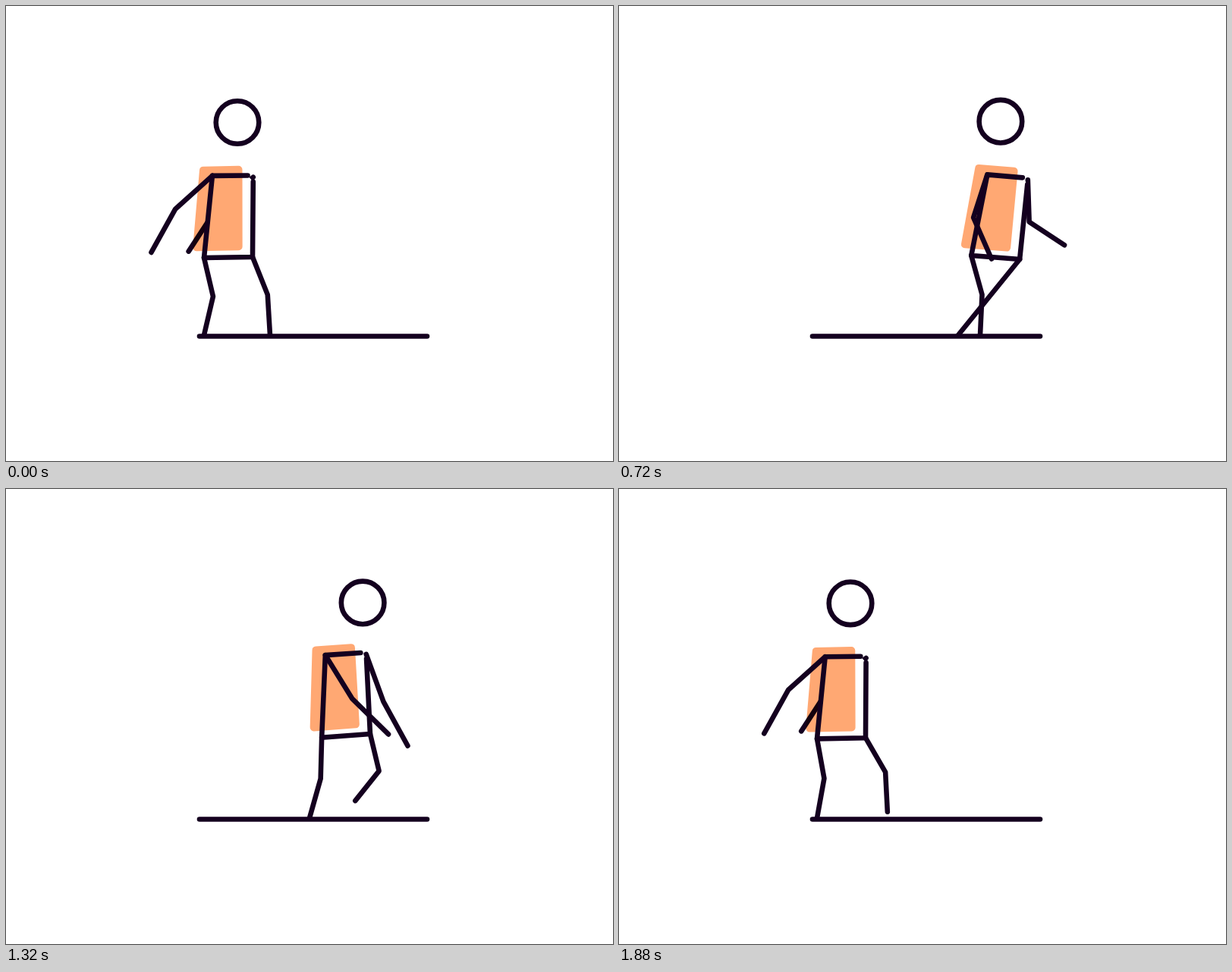
An HTML page with a canvas for the animation above (1920 ms loop, 800x600 px).

```html
<!DOCTYPE html>
<html lang="en">
<head>
<meta charset="utf-8">
<title>Walking figure</title>
<style>
  html, body { margin: 0; width: 100%; height: 100%; overflow: hidden; background: #fff; }
  canvas { display: block; }
</style>
</head>
<body>
<canvas id="stage" width="800" height="600"></canvas>
<script>
const ctx = document.getElementById('stage').getContext('2d');
const LOOP = 1920, TICK = 40;
const INK = '#14001f', ORANGE = '#ffa873', WIDTH = 6.6;
const FLOOR = 434, HIP_HEIGHT = 331.5;

// Footfalls, near and far foot in turn: four strides out, six back
const LANDINGS = [320, 447, 476, 542, 400, 447, 328, 378, 261, 348];
const OUT_STEPS = 4, OUT_TIME = 240, BACK_START = 1070;
const BACK_TIME = (LOOP - BACK_START) / (LANDINGS.length - OUT_STEPS);

// Torso outline around the middle of the hips
const TORSO = [[34.5, -99.2], [32, 0], [-32, 0], [-19.2, -108], [27.4, -107.6]];
const SHOULDER = [34.6, -105.2];
const PACK = [[-35.5, -120.4], [20.6, -120.4], [18.8, -9], [-47, -9]];

const rad = deg => deg * Math.PI / 180;

// Smooth 0 to 1; a bias above 1 starts faster and settles longer
function ease(t, start, end, bias = 1) {
  const v = Math.min(1, Math.max(0, (t - start) / (end - start)));
  const u = 1 - (1 - v) ** bias;
  return u * u * (3 - 2 * u);
}

// A value that makes eased moves: [change, start, end, bias]
const mover = (base, ...moves) => t =>
  moves.reduce((sum, [change, ...span]) => sum + change * ease(t, ...span), base);

const hipX = mover(293, [220, 210, 945, 1.5], [-220, 1012, 1868]);
const tilt = mover(-1, [5.5, 0, 400], [-9.8, 680, 1480], [4.3, 1500, 1920]);
const headX = mover(12, [-10.5, 100, 480], [21, 480, 1520, 1.5], [-10.5, 1520, 1880]);

// Angles in degrees from straight down, positive to the right
const nearArm = {
  upper: mover(-48, [24.5, 0, 320], [75.5, 640, 1120], [-100, 1120, 1810]),
  lower: mover(-29, [5.5, 0, 320], [88, 500, 920], [-93.5, 1120, 1810]),
  size: mover(65.5, [4, 0, 320], [-10, 480, 720], [8, 720, 1120], [-2, 1120, 1920])
};
const farArm = {
  upper: mover(-49, [26, 0, 360], [67.5, 440, 1120], [-94.5, 1120, 1720]),
  lower: mover(-33, [99, 40, 880], [-99, 1120, 1600]),
  size: mover(65.5, [-10, 320, 720], [9, 720, 1120], [4, 1120, 1520], [-3.5, 1520, 1920])
};

// Both feet, and how far the body rises over the stepping leg
function gait(t) {
  const feet = LANDINGS.slice(-2).map(x => [x, FLOOR]);
  let rise = 0;
  LANDINGS.forEach((to, i) => {
    const out = i < OUT_STEPS;
    const start = out ? i * OUT_TIME : BACK_START + (i - OUT_STEPS) * BACK_TIME;
    const u = (t - start) / (out ? OUT_TIME : BACK_TIME);
    if (u <= 0) return;
    const foot = feet[i % 2], stride = Math.abs(to - foot[0]);
    if (u < 1) {
      const arch = Math.sin(Math.PI * u);
      foot[1] -= Math.min(34, stride * 0.36) * arch;
      rise = Math.min(13.5, stride * 0.15) * arch * arch;
    }
    foot[0] += (to - foot[0]) * ease(u, 0, 1);
  });
  return { feet, rise };
}

// The knee bends forward as the leg gets shorter
function legPoints(hip, foot) {
  const dx = foot[0] - hip[0], dy = foot[1] - hip[1];
  const d = Math.hypot(dx, dy);
  const bend = Math.max(0, Math.min(22, (114.5 - d) * 0.95));
  const knee = [(hip[0] + foot[0]) / 2 + dy / d * bend, (hip[1] + foot[1]) / 2 - dx / d * bend];
  return [hip, knee, foot];
}

function armPoints(start, arm, t) {
  const size = arm.size(t);
  const next = (p, deg) => [p[0] + size * Math.sin(rad(deg)), p[1] + size * Math.cos(rad(deg))];
  const elbow = next(start, arm.upper(t));
  return [start, elbow, next(elbow, arm.lower(t))];
}

function trace(points) {
  ctx.beginPath();
  points.forEach(p => ctx.lineTo(...p));
}

function line(points) {
  trace(points);
  ctx.stroke();
}

function roundShape(points, r) {
  const n = points.length, last = points[n - 1];
  ctx.beginPath();
  ctx.moveTo((last[0] + points[0][0]) / 2, (last[1] + points[0][1]) / 2);
  points.forEach((p, i) => ctx.arcTo(...p, ...points[(i + 1) % n], r));
  ctx.closePath();
  ctx.fill();
}

function draw(t) {
  const { feet, rise } = gait(t);
  const x = hipX(t), y = HIP_HEIGHT - rise, angle = rad(tilt(t));
  const c = Math.cos(angle), s = Math.sin(angle);
  const place = p => [x + p[0] * c - p[1] * s, y + p[0] * s + p[1] * c];
  const torso = TORSO.map(place);

  ctx.fillStyle = '#fff';
  ctx.fillRect(0, 0, 800, 600);
  ctx.strokeStyle = INK;
  ctx.lineWidth = WIDTH;
  ctx.lineCap = ctx.lineJoin = 'round';

  // The torso hides the far arm; the orange panel lets it show
  line(armPoints(place(SHOULDER), farArm, t));
  trace(torso);
  ctx.fill();
  ctx.globalCompositeOperation = 'multiply';
  ctx.fillStyle = ORANGE;
  roundShape(PACK.map(place), 5);
  ctx.globalCompositeOperation = 'source-over';

  line(legPoints(torso[1], feet[1]));
  line(legPoints(torso[2], feet[0]));
  line(torso);
  line(armPoints(torso[3], nearArm, t));

  const hx = headX(t);
  ctx.beginPath();
  ctx.arc(x + hx, y - 181 + hx * 0.25, 28.3, 0, Math.PI * 2);
  ctx.stroke();

  line([[255, 435.5], [555, 435.5]]);
}

let begin = null;
function tick(now) {
  if (begin === null) begin = now;
  draw(Math.floor(((now - begin) % LOOP) / TICK) * TICK);
  requestAnimationFrame(tick);
}
draw(0);
requestAnimationFrame(tick);
</script>
</body>
</html>
```
